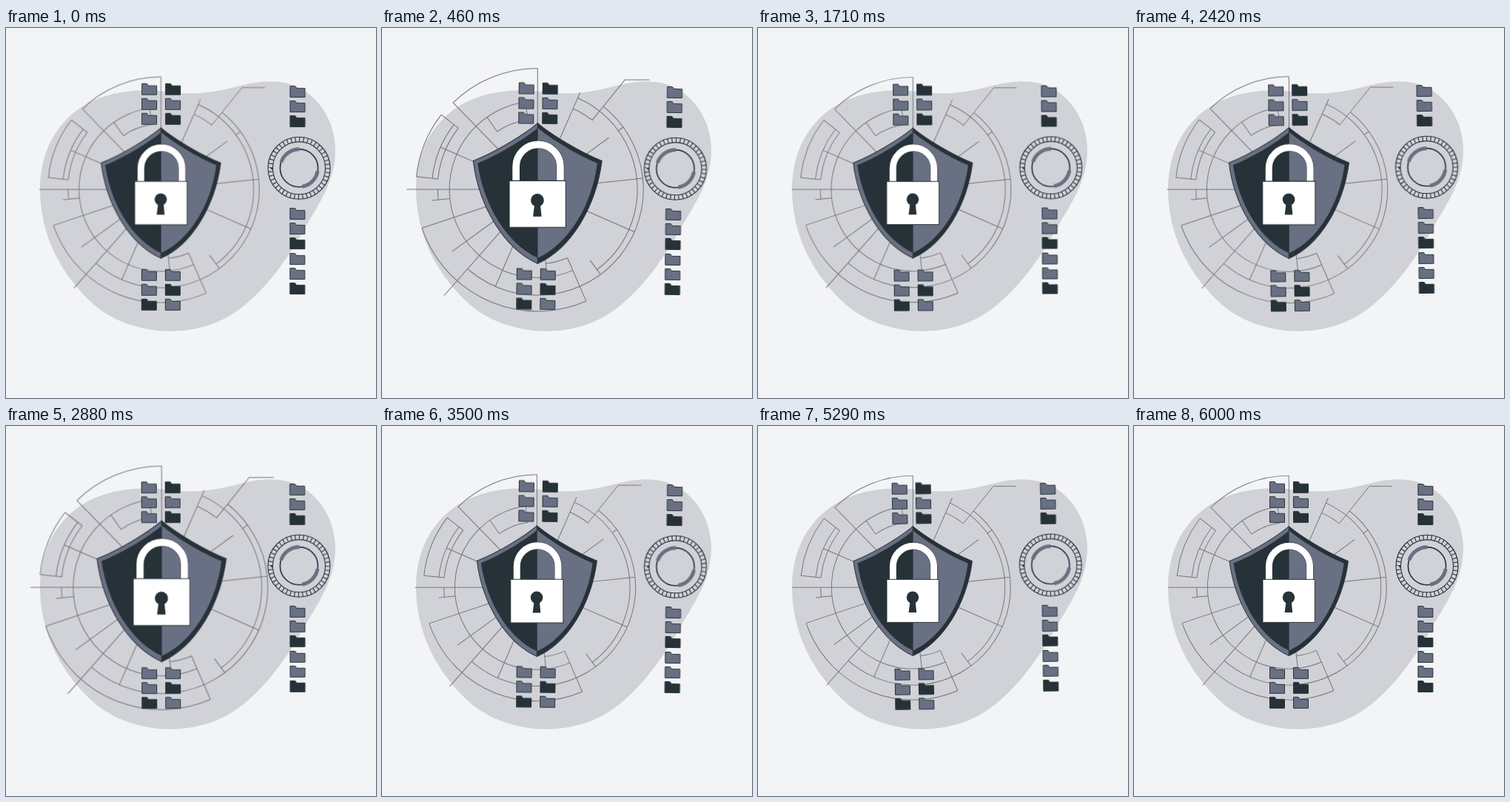
Animation of 500x500 px, one loop 6040 ms. Source, as an HTML page without scripts:

```html
<!DOCTYPE html>
<html lang="en">
<head>
<meta charset="utf-8">
<title>Data security</title>
<style>
  html, body { margin: 0; width: 100%; height: 100%; overflow: hidden; background: #f2f4f6; }
  svg { display: block; width: 100%; height: 100%; }
  .dark { fill: #263238; }
  .slate { fill: #6a7083; }
  .edge { stroke: #263238; stroke-width: 1; }
  .lines { fill: none; stroke: #737478; stroke-width: .95; }
  .ring { fill: none; stroke: #263238; }
  .arc { fill: none; stroke: #6a7083; stroke-width: 5; }

  .beat { transform-origin: 197.6px 218.4px; animation: beat 6.04s linear infinite; }
  .sway { transform-origin: 311px 228px; animation: sway 6.04s linear infinite; }

  /* a beat with a slow release, a rest, then a quick beat */
  @keyframes beat {
    0% { transform: scale(1.0067); }
    9.272% { transform: scale(1.1); }
    29.139%, 39.073% { transform: scale(1); }
    49.007% { transform: scale(1.1); }
    58.94%, 100% { transform: scale(1); }
  }
  @keyframes sway {
    0% { transform: rotate(.053deg); }
    11.755%, 61.424% { transform: rotate(1deg); }
    36.589%, 86.258% { transform: rotate(-1deg); }
    98.675%, 100% { transform: rotate(0deg); }
  }
</style>
</head>
<body>
<svg viewBox="0 0 500 500" xmlns="http://www.w3.org/2000/svg">
  <defs>
    <path id="folder" class="edge" d="M.5 .5H7.2L9.2 3.4H20.5V15.4H.5Z"/>
    <path id="shackle" d="M182.4 208V189.7A27.6 27.6 0 0 1 237.6 189.7V208"/>
  </defs>

  <path fill="#d1d2d8" d="M46 218C46 160 75 118 118 98C150 84 185 82 215 86C245 90 270 89 300 82C325 76 345 70 370 73C415 78 445 120 445 165C445 205 425 235 405 268C380 314 338 376 284 398C232 419 165 412 120 375C70 330 46 275 46 218Z"/>

  <g class="beat">
    <!-- radar: arcs by start angle and sweep, spokes by angle -->
    <g class="lines" transform="translate(209.3 218.1)">
      <circle r="151" pathLength="360" stroke-dasharray="44.3 360" transform="rotate(225.7)"/>
      <circle r="152" pathLength="360" stroke-dasharray="95 360" transform="rotate(66.5)"/>
      <circle r="152" pathLength="360" stroke-dasharray="31.8 360" transform="rotate(186)"/>
      <circle r="132" pathLength="360" stroke-dasharray="31.8 360" transform="rotate(186)"/>
      <circle r="125" pathLength="360" stroke-dasharray="31.8 360" transform="rotate(186)"/>
      <circle r="132" pathLength="360" stroke-dasharray="182.8 360" transform="rotate(-51.5)"/>
      <circle r="124.5" pathLength="360" stroke-dasharray="119.8 360" transform="rotate(-66.3)"/>
      <circle r="124.5" pathLength="360" stroke-dasharray="6 360" transform="rotate(174)"/>
      <circle r="110" pathLength="360" stroke-dasharray="195.5 360" transform="rotate(66.5)"/>
      <circle r="110" pathLength="360" stroke-dasharray="14.8 360" transform="rotate(-66.3)"/>
      <circle r="93" pathLength="360" stroke-dasharray="17.2 360" transform="rotate(66.5)"/>
      <circle r="88" pathLength="360" stroke-dasharray="27 360" transform="rotate(235)"/>

      <path d="M60 0H151" transform="rotate(270)"/>
      <path d="M60 0H151" transform="rotate(225.7)"/>
      <path d="M60 0H163.2" transform="rotate(180)"/>
      <path d="M60 0H152" transform="rotate(161.5)"/>
      <path d="M60 0H176.5" transform="rotate(131.4)"/>
      <path d="M60 0H132" transform="rotate(144)"/>
      <path d="M60 0H132" transform="rotate(113.5)"/>
      <path d="M60 0H132" transform="rotate(203.5)"/>
      <path d="M60 0H132" transform="rotate(23.7)"/>
      <path d="M60 0H132" transform="rotate(-6)"/>
      <path d="M60 0H132" transform="rotate(-66.3)"/>
      <path d="M60 0H110" transform="rotate(-36)"/>
      <path d="M124.5 0H132" transform="rotate(-36)"/>
      <path d="M110 0H132" transform="rotate(53.5)"/>
      <path d="M93 0H152" transform="rotate(66.5)"/>
      <path d="M85 0H110" transform="rotate(83.7)"/>
      <path d="M110 0H132" transform="rotate(174)"/>
      <path d="M125 0H152" transform="rotate(186)"/>
      <path d="M125 0H152" transform="rotate(217.8)"/>
      <path d="M88 0H110" transform="rotate(235)"/>
      <path d="M88 0H110" transform="rotate(262)"/>
      <path d="M68.2-86.4L108.8-136.7H139.6"/>
    </g>

    <path class="dark edge" d="M209.3 135.5C226.6 150 262 171.5 289.5 182.5C282 240 251 292 209.3 310.5Z"/>
    <path class="slate edge" d="M209.3 135.5C192 150 157 171.5 129 182.5C136 240 168 292 209.3 310.5Z"/>
    <path class="dark" d="M209.6 141.5C193 155 162 174.5 134.5 185.5C142 238 171 286 209.6 303.5Z"/>
    <path class="slate" d="M209.6 141.5C226 155 257 174.5 283.7 185.5C277 238 248 286 209.6 303.5Z"/>

    <g fill="none">
      <use href="#shackle" stroke="#263238" stroke-width="9.8"/>
      <use href="#shackle" stroke="#fff" stroke-width="8.9"/>
    </g>
    <path class="edge" fill="#fff" d="M174 207.3H244.4V265.4H174Z"/>
    <circle class="dark" cx="209" cy="231.6" r="8.2"/>
    <path class="dark" d="M205.6 236H212.6L214.2 252H203.6Z"/>
  </g>

  <g class="sway">
    <g class="slate">
      <use href="#folder" x="183" y="74.8"/>
      <use href="#folder" x="183" y="94.9"/>
      <use href="#folder" x="183" y="114.9"/>
      <use href="#folder" x="215" y="94.9"/>
      <use href="#folder" x="183" y="325.9"/>
      <use href="#folder" x="215" y="325.9"/>
      <use href="#folder" x="183" y="345.9"/>
      <use href="#folder" x="215" y="365.9"/>
      <use href="#folder" x="383.4" y="78"/>
      <use href="#folder" x="383.4" y="98"/>
      <use href="#folder" x="383.4" y="243"/>
      <use href="#folder" x="383.4" y="263"/>
      <use href="#folder" x="383.4" y="304"/>
      <use href="#folder" x="383.4" y="324"/>
    </g>
    <g class="dark">
      <use href="#folder" x="215" y="74.8"/>
      <use href="#folder" x="215" y="114.9"/>
      <use href="#folder" x="215" y="345.9"/>
      <use href="#folder" x="183" y="365.9"/>
      <use href="#folder" x="383.4" y="118"/>
      <use href="#folder" x="383.4" y="283"/>
      <use href="#folder" x="383.4" y="344"/>
    </g>

    <g class="ring" transform="translate(396 189.2)">
      <circle r="42" stroke-width="1.1"/>
      <circle r="35.6" stroke-width="1.1"/>
      <circle r="38.8" stroke-width="6.4" pathLength="440" stroke-dasharray="2 8"/>
      <circle r="25.6" stroke-width="1.6"/>
      <circle class="arc" r="25.4" pathLength="360" stroke-dasharray="73 360" transform="rotate(198)"/>
      <circle class="arc" r="25.4" pathLength="360" stroke-dasharray="71 360" transform="rotate(9)"/>
    </g>
  </g>
</svg>
</body>
</html>
```
